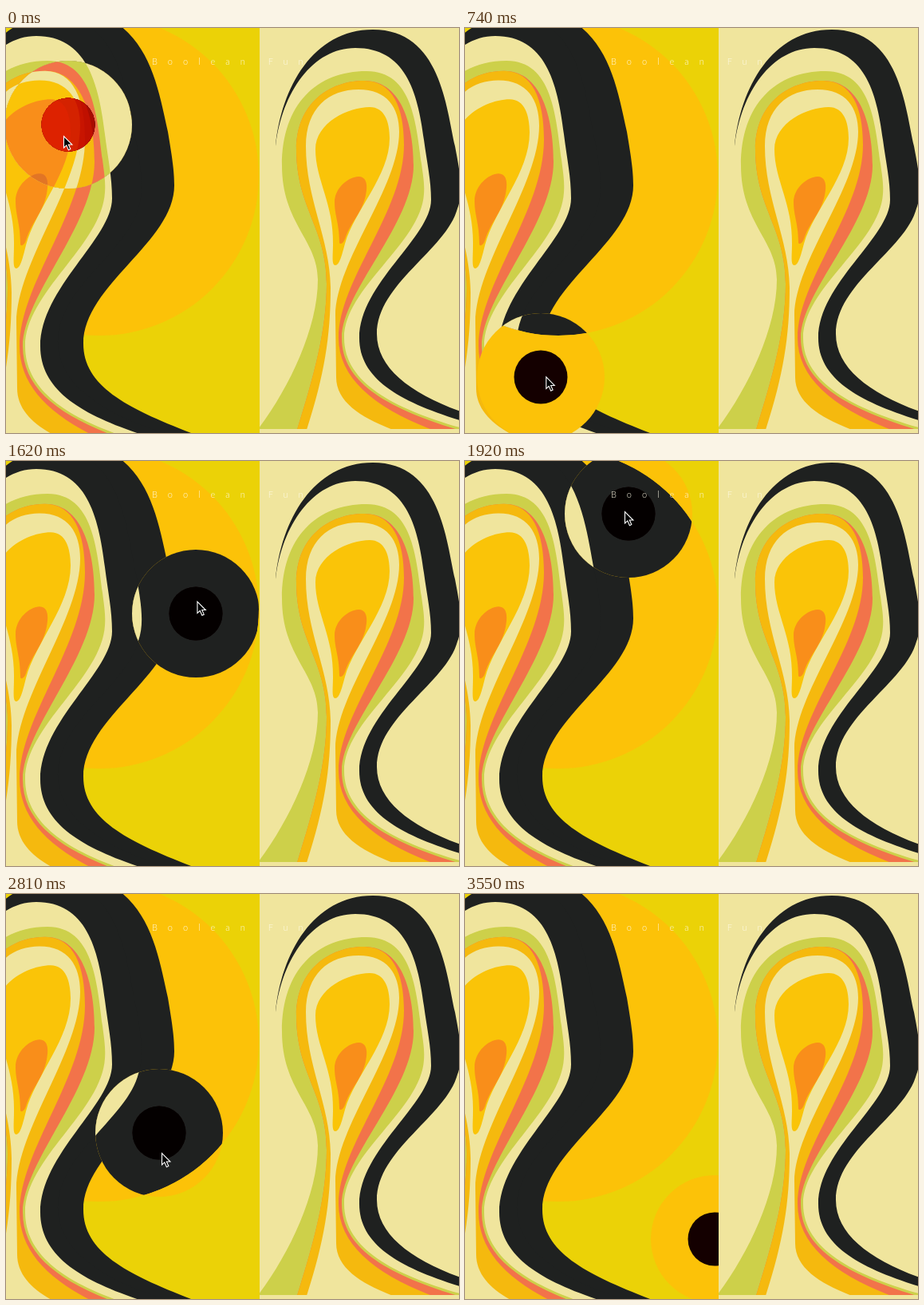
An HTML page with a canvas that plays this animation: 568 by 507 pixels, repeating every 4000 ms.

```html
<!DOCTYPE html>
<html lang="en">
<head>
<meta charset="utf-8">
<title>Boolean</title>
<style>
  html, body { margin: 0; width: 100%; height: 100%; overflow: hidden; background: #f0e59d; }
  canvas { display: block; }
  .title {
    position: absolute; left: 183px; top: 35px;
    font: 300 11px/14px Lato, "Open Sans", sans-serif;
    letter-spacing: 13px; white-space: pre; color: #fffbe6;
  }
</style>
</head>
<body>
<canvas id="stage" width="568" height="507"></canvas>
<div class="title">Boolean Fun</div>
<script>
const ctx = document.getElementById('stage').getContext('2d');
const LOOP = 4000, SPLIT = 318, RING = 80, DISC = 33.5, LAG = 0.18;

const INK = '#1f2120', CREAM = '#f0e59d', YELLOW = '#ebd207', SUN = '#fcc208';
const GREEN = '#cdd04a', SALMON = '#f2734a', GOLD = '#f5b90e', DROP = '#fac408';
const DEEP = '#f98e1a', DEEPER = '#e27525';

const vaseLeft = 'M362,512 C385,440 402,380 402,320 C402,250 364,225 364,152 C364,95 405,66 449,66 ';
const tail = x => ` L600,600 L${x},600 Z`;

// Nested outlines, from the outside in.
const vase = [
  'M338,148 C345,75 385,2 460,2 C545,2 552,100 563,148 C569,180 574,205 566,226' +
    ' C552,278 465,320 465,383 C465,432 520,466 600,490' + tail(338),
  'M338,148 C346,80 385,25 438,25 C500,25 516,78 524,140 C528,170 533,190 533,215' +
    ' C533,262 443,320 443,388 C443,445 505,474 600,500' + tail(338),
  'M310,510 C350,460 391,380 391,315 C391,265 346,245 346,172 C346,95 390,54 452,54' +
    ' C510,54 514,120 521,170 C523,185 525,195 524,208 C520,270 424,325 424,388' +
    ' C424,450 500,482 590,506' + tail(310),
  vaseLeft + 'C500,66 511,130 511,172 C511,245 421,330 421,388 C421,445 480,478 580,507' + tail(362),
  vaseLeft + 'C485,66 499,100 499,146 C499,230 417,315 417,388 C417,440 465,478 545,507' + tail(362),
  'M374,512 C398,440 407,390 407,325 C406,262 376,215 376,148 C376,100 405,77 442,77' +
    ' C478,77 493,100 493,130 C493,200 414,290 413,360 L414,437 C414,475 460,495 510,512' + tail(374),
  'M388,152 C388,118 430,99 456,99 C475,99 481,118 481,138 C481,185 437,228 425,270' +
    ' C421,285 418,297 413,297 C408,297 410,285 410,270 C411,220 388,190 388,152 Z',
  'M412,218 C412,200 430,186 442,186 C451,186 453,194 452,203 C449,230 433,240 425,264' +
    ' C423,270 418,272 418,268 C418,245 412,235 412,218 Z'
].map(d => new Path2D(d));

const toLeft = new DOMMatrix([1, 0, 0, 1.07, -400, -16.8]);
const leftVase = vase.map(shape => {
  const moved = new Path2D();
  moved.addPath(shape, toLeft);
  return moved;
});

const ribbon = new Path2D('M-62,120 C-45,50 -10,12 24,0 L70,-20 L125,-15 C180,15 190,70 203,130' +
  ' C208,160 211,178 211,197 C211,268 97,322 97,395 C97,448 150,475 232,507 L232,560 L-62,560 Z');
const sun = disc(117, 185, 200);
const arrow = new Path2D('M0,0 V14.5 L3.3,11.4 L5.9,17.2 L8.3,16.1 L5.8,10.5 H10.4 Z');

const plain = [INK, CREAM, GREEN, SALMON, GOLD, CREAM, DROP, DEEP];
const shifted = [CREAM, GREEN, SALMON, GOLD, CREAM, DROP, DEEP, DEEPER];
const reds = ['#860a00', '#800600', '#a80c00', '#c01000', '#c81400', '#d42200', '#dd2200', '#c82800'];

// time, ring x, ring y, and the pointer tip where it is not simply ahead of the ring
const steps = [
  [0, 78, 121, 72, 135], [150, 62, 207], [290, 56, 243], [440, 51, 304, 50, 319],
  [590, 58, 386], [740, 95, 437], [890, 130, 434], [1030, 154, 434],
  [1180, 187, 407, 191, 399], [1330, 206, 377], [1470, 221, 315], [1620, 238, 191],
  [1770, 246, 105], [1920, 205, 66, 200, 63], [2070, 177, 54], [2220, 146, 53],
  [2370, 124, 61], [2510, 112, 90, 108, 101], [2660, 127, 161], [2810, 192, 299, 195, 324],
  [2960, 197, 332], [3110, 202, 356], [3260, 313, 432, 352, 453], [3400, 313, 432, 444, 503],
  [3550, 313, 432, 600, 600]
];

function disc(x, y, r) {
  const path = new Path2D();
  path.arc(x, y, r, 0, Math.PI * 2);
  return path;
}

function fill(path, color) {
  ctx.fillStyle = color;
  ctx.fill(path);
}

function fillAll(shapes, colors) {
  shapes.forEach((shape, i) => fill(shape, colors[i]));
}

function clipped(path, draw) {
  ctx.save();
  ctx.clip(path);
  draw();
  ctx.restore();
}

function box(x, y, w, h) {
  const path = new Path2D();
  path.rect(x, y, w, h);
  return path;
}

const leftPanel = box(0, 0, SPLIT, 507);
const rightPanel = box(SPLIT, 0, 250, 502);

// Inside a lens the vase takes other colours, but only where the sun lies behind it.
function lens(path, base, onSun, colors) {
  fill(path, base);
  clipped(path, () => clipped(sun, () => {
    fill(sun, onSun);
    fillAll(leftVase, colors);
  }));
}

function pointer(x, y) {
  ctx.save();
  ctx.translate(x + 0.5, y + 0.5);
  fill(arrow, '#000');
  ctx.strokeStyle = '#fff';
  ctx.lineWidth = 1.1;
  ctx.stroke(arrow);
  ctx.restore();
}

function drawStep(index) {
  const [, x, y, tipX, tipY] = steps[index];
  const [, nextX, nextY] = steps[(index + 1) % steps.length];
  fill(box(0, 0, 568, 507), CREAM);
  clipped(rightPanel, () => fillAll(vase, plain));
  clipped(leftPanel, () => {
    fill(leftPanel, YELLOW);
    fill(sun, SUN);
    fill(ribbon, INK);
    fillAll(leftVase, plain);
    lens(disc(x, y, RING), SUN, INK, shifted);
    lens(disc(x, y, DISC), '#140000', '#040000', reds);
  });
  pointer(tipX ?? x + LAG * (nextX - x), tipY ?? y + LAG * (nextY - y));
}

const start = performance.now();
let shown = -1;

function tick() {
  const time = (performance.now() - start) % LOOP;
  const index = steps.findLastIndex(step => step[0] <= time);
  if (index !== shown) drawStep(shown = index);
  requestAnimationFrame(tick);
}
tick();
</script>
</body>
</html>
```
